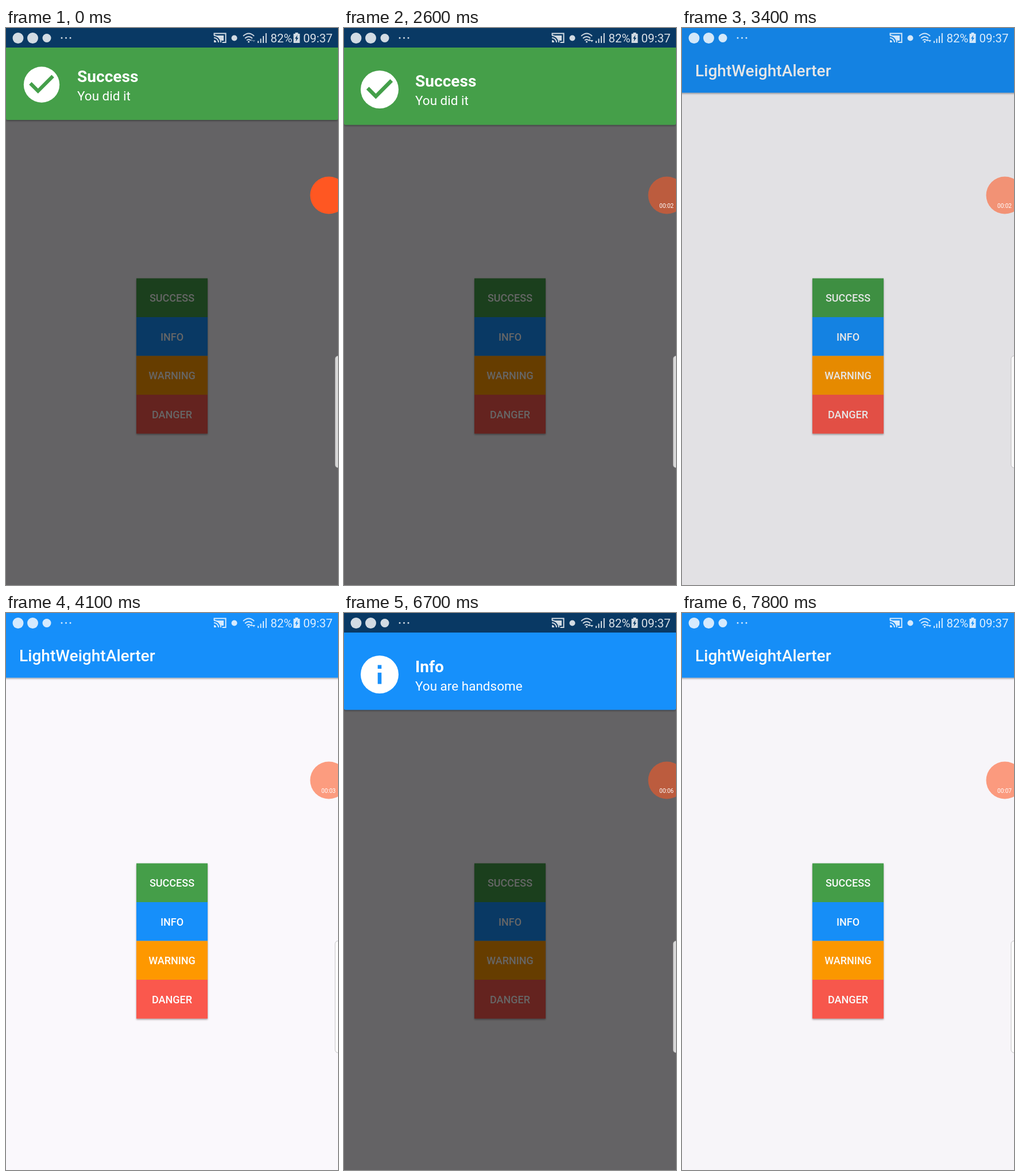
These frames come from a looping animation (578x969 px, 8 s). An HTML page:

```html
<!DOCTYPE html>
<html lang="en">
<head>
<meta charset="utf-8">
<title>Alert demo</title>
<style>
  html, body { margin: 0; width: 100%; height: 100%; overflow: hidden; background: #fbf9fd; }
  svg { display: block; width: 578px; height: 969px; font-family: Roboto, sans-serif; fill: #fff; }
  .mid { text-anchor: middle; }
  .label { font-size: 18px; font-weight: 500; }
  .status { font-size: 20.5px; font-stretch: 75%; }
  .line { fill: none; stroke: #fff; }
</style>
</head>
<body>
<svg viewBox="0 0 578 969">
  <defs>
    <clipPath id="below"><rect y="34" width="578" height="935"/></clipPath>
    <filter id="shade" x="-10%" y="-10%" width="120%" height="130%">
      <feDropShadow dx="0" dy="1.5" stdDeviation="1.5" flood-color="#000" flood-opacity=".4"/>
    </filter>
  </defs>

  <rect width="578" height="969" fill="#fbf9fd"/>
  <rect x="-9" y="-9" width="596" height="121.5" fill="#1890fb" filter="url(#shade)"/>
  <text x="23" y="84" font-size="28.1" font-weight="500">LightWeightAlerter</text>
  <g id="buttons" filter="url(#shade)"></g>
  <rect id="dim" width="578" height="969" fill="#000"/>

  <g clip-path="url(#below)">
    <g id="alert">
      <rect id="card" x="0" y="-20" width="578" height="188.5" rx="3" filter="url(#shade)"/>
      <g id="icon">
        <circle r="33"/>
        <path id="mark" transform="scale(3.3) translate(-12 -12)"/>
      </g>
      <text id="head" x="124" y="102.5" font-size="28.1" font-weight="700"></text>
      <text id="body" x="124" y="134.5" font-size="22.5"></text>
    </g>
  </g>

  <g opacity=".82">
    <circle cx="21" cy="17.5" r="9.5"/>
    <circle cx="46.5" cy="17.5" r="9.5"/>
    <circle cx="71" cy="17.5" r="7.5"/>
    <path class="line" d="M97 17.2h.01M104.5 17.2h.01M112 17.2h.01" stroke-width="3" stroke-linecap="round"/>
    <path class="line" d="M362.500 13v-3.500h20v15.500h-6M362 17a8 8 0 0 1 8 8M362 13a12 12 0 0 1 12 12" stroke-width="2"/>
    <path d="M362 21a4 4 0 0 1 4 4h-4zM366 13h13v9h-4a12 12 0 0 0-9-7z"/>
    <circle cx="397.500" cy="17.500" r="5"/>
    <path class="line" d="M413 14q9.500-9 19 0M416 18q6.500-6 13 0M419 21.500q3.500-3 7 0" stroke-width="1.8"/>
    <circle cx="422.5" cy="24" r="1.600"/>
    <g id="arrows"><path d="M425 22.500l2.500-3.500 2.500 3.500zM429 21l2.500 3.500 2.500-3.500z"/></g>
    <path class="line" d="M439 26v-3.500M443.500 26v-7.500M448 26v-12M452.800 26v-17" stroke-width="2"/>
    <path fill-rule="evenodd" d="M503.500 10v-2h5v2h3v16h-11v-16zM507.500 12l-4.500 6.500h2.500l-1 5 4.500-6.500h-2.500z"/>
  </g>
  <g class="status" opacity=".85">
    <text x="460.500" y="25">82%</text>
    <text x="517.500" y="25">09:37</text>
  </g>

  <circle id="bubble" cx="562" cy="291" r="32.500" fill="#ff5722"/>
  <text id="timer" class="mid" x="561.500" y="312.500" font-size="10"></text>
  <rect x="573" y="570.5" width="12" height="194.500" rx="5" fill="#fff" fill-opacity=".75" stroke="#999" stroke-opacity=".7" stroke-width=".8"/>
</svg>
<script>
const LOOP = 8000, TRAVEL = 134.5;
const $ = id => document.getElementById(id);
const ramp = (t, from, to) => Math.min(1, Math.max(0, (t - from) / (to - from)));

const alerts = [
  { start: -360, leave: 2600, color: '#449f4a', head: 'Success', body: 'You did it',
    mark: 'M10 17l-5-5 1.410-1.410L10 14.170l7.590-7.590L19 8z' },
  { start: 4100, leave: 6920, color: '#1890fb', head: 'Info', body: 'You are handsome',
    mark: 'M11 17h2v-6h-2zM11 9h2V7h-2z' }
];

$('buttons').innerHTML = [
  ['SUCCESS', '#449f4a'], ['INFO', '#1890fb'], ['WARNING', '#ff9900'], ['DANGER', '#fb584d']
].map(([name, color], i) => {
  const y = 435.5 + i * 67.5;
  return `<rect x="227" y="${y}" width="124" height="67.6" fill="${color}"/>
    <text class="label mid" x="289" y="${y + 40.7}">${name}</text>`;
}).join('');

let shown;
function show(a) {
  if (a === shown) return;
  shown = a;
  $('card').setAttribute('fill', a.color);
  $('mark').setAttribute('fill', a.color);
  $('mark').setAttribute('d', a.mark);
  $('head').textContent = a.head;
  $('body').textContent = a.body;
}

function draw(t) {
  const a = alerts[t < 3800 ? 0 : 1];
  show(a);
  const age = t - a.start, gone = t - a.leave;

  // decelerate in, accelerate out
  const hidden = (1 - ramp(age, 0, 600)) ** 3 + ramp(gone, 0, 550) ** 2;
  $('alert').setAttribute('transform', `translate(0 ${-hidden * (TRAVEL + 5 * ramp(hidden, .5, 1))})`);

  const u = ramp(age, 360, 1360);
  const scale = 1 - .055 * (1 - u) * Math.cos(Math.PI * 1.17 * u);
  $('icon').setAttribute('transform', `translate(62 107) scale(${scale})`);

  const dim = ramp(age, 0, 300) * (1 - ramp(gone, 550, 920)) ** 1.6;
  $('dim').setAttribute('opacity', .6 * dim);

  $('arrows').setAttribute('opacity', t < 1600 || (t >= 4700 && t < 6700) ? .4 : 1);
  const idle = t >= 1600;
  $('bubble').setAttribute('opacity', idle ? .57 : 1);
  $('timer').textContent = idle ? '00:0' + Math.floor((t - 550) / 1022) : '';
}

const begin = performance.now();
function tick() {
  draw((performance.now() - begin) % LOOP);
  requestAnimationFrame(tick);
}
tick();
</script>
</body>
</html>
```
